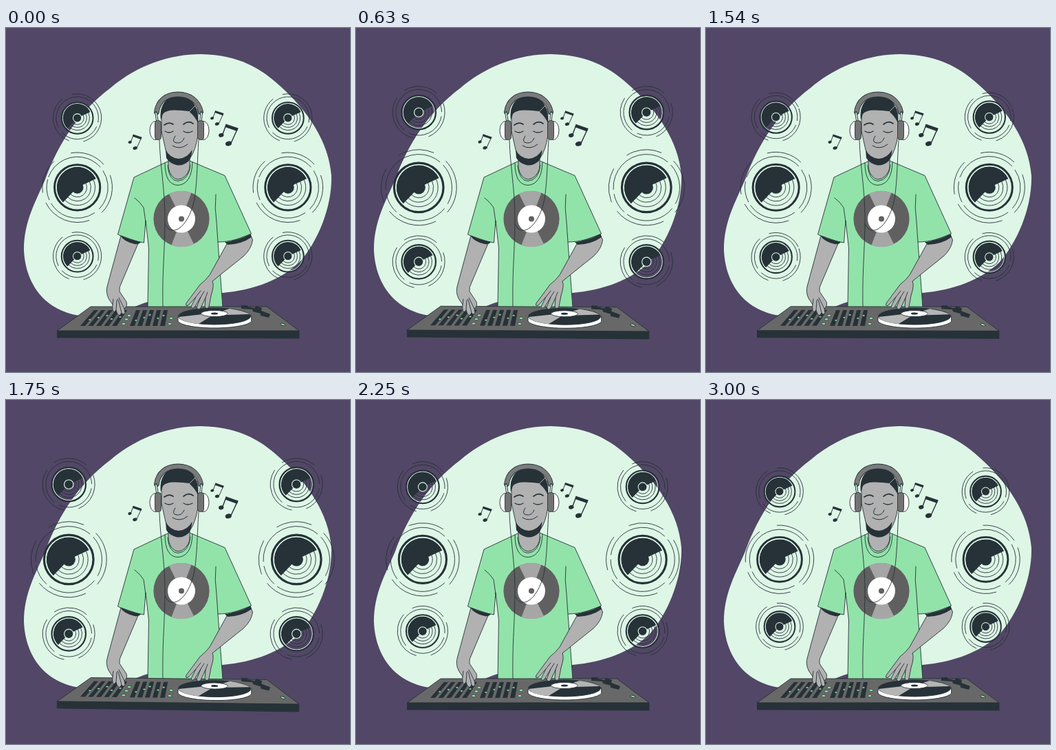
An HTML page that plays this animation: 500x500 px, repeating every 3040 ms.

```html
<!DOCTYPE html>
<html lang="en">
<head>
<meta charset="utf-8">
<title>DJ at the deck</title>
<style>
html, body { margin: 0; width: 100%; height: 100%; overflow: hidden; background: #524766; }
svg { display: block; width: 100vw; height: 100vh; }
.ink { fill: #263238; }
.line { fill: none; stroke: #263238; stroke-width: .9; stroke-linecap: round; stroke-linejoin: round; }
.rings * { vector-effect: non-scaling-stroke; }
.shape { stroke: #263238; stroke-width: .9; stroke-linejoin: round; }
.shirt { fill: #92e3a9; }
.skin { fill: #b1b1b1; }
.metal { fill: #686868; }
.pale { fill: none; stroke: #def6e6; }
</style>
</head>
<body>
<svg viewBox="0 0 500 500">
  <defs>
    <g id="speaker">
      <path class="ink" d="M0 0L27.5 -12.8A30.3 30.3 0 1 0 -21 21.8Z"/>
      <circle class="pale" r="31.2" stroke-width="1.4"/>
      <circle class="line" r="33.4" style="stroke-width:3"/>
      <g class="line rings">
        <path d="M23.6 -11A26 26 0 0 1 -18 18.8M18.1 -8.5A20 20 0 0 1 -13.9 14.4M12.7 -5.9A14 14 0 0 1 -9.7 10.1"/>
        <circle r="45" stroke-dasharray="92 7 60 9 72 6 30 7" transform="rotate(-160)"/>
        <circle r="51.3" stroke-dasharray="58 22 74 16 50 28 52 22" transform="rotate(-20)"/>
      </g>
      <circle class="ink" r="9"/>
    </g>
    <g id="note">
      <path class="ink" d="M10.5 3L28.5 9L27 13.500L9.5 7.500Z"/>
      <path class="line" d="M11 4L5.500 19M27.700 9.500L18 31" style="stroke-width:1.400"/>
      <ellipse class="ink" cx="3.800" cy="19.200" rx="3.800" ry="2.900" transform="rotate(-15 3.800 19.200)"/>
      <ellipse class="ink" cx="14.500" cy="31.500" rx="4.600" ry="3.300" transform="rotate(-15 14.500 31.500)"/>
    </g>
  </defs>

  <path fill="#def6e6" d="M283 38C340 39 372 60 398 84C438 120 469 164 473 215C474 262 452 312 427 340C400 366 360 381 315 385C270 388 230 390 200 400C170 412 150 420 118 419C60 416 28 375 26 322C26 280 44 251 57 220C77 165 108 120 152 87C192 53 240 38 283 38Z"/>
  <g id="speakers"></g>
  <g id="notes">
    <use href="#note" x="309" y="136.5"/>
    <use href="#note" transform="translate(297 118) scale(.68)"/>
    <use href="#note" transform="translate(177.5 152.5) scale(.7)"/>
  </g>

  <!-- torso -->
  <path class="shape shirt" d="M235 194L186 217L162.5 300C175 306 188 310 200.5 312L203 280L207.5 320L206 406H315L308 311C325 311 342 306 356.5 299L318 214.5L267 193Z"/>
  <path class="line" d="M187 247Q195 253 200 261L203 282M305 242Q303 262 306 282L308 311"/>
  <path class="shape skin" d="M236 180V204Q240 219 250 220Q262 219 267 204V180Z"/>
  <path class="line" d="M231 196Q231 228 250 228.5Q270 227 271 195M235 200Q237 222 250 222.5Q266 221 268 199"/>
  <g transform="translate(255 277.5)">
    <circle r="40.6" fill="#606060"/>
    <path fill="#a6a6a6" d="M0 0L-18 -36.4A40.6 40.6 0 0 1 14.5 -38ZM0 0L-14.5 38A40.6 40.6 0 0 0 18 36.4Z"/>
    <circle r="20" fill="#fff"/>
    <circle r="4" fill="#606060"/>
  </g>

  <!-- head and headphones -->
  <ellipse class="shape" cx="217" cy="149" rx="8" ry="13.5" fill="#fff"/>
  <ellipse class="shape" cx="287" cy="149" rx="8" ry="13.5" fill="#fff"/>
  <path class="shape skin" d="M226 118H279V155Q276 178 267 190Q258 200 249 198Q236 191 232 177L226 150Z"/>
  <path class="ink" d="M225 134C222 112 234 98 250 98C268 98 281 112 279 138Q275 130 271 126L266 121Q254 119 242 119.5Q232 120 228 125Z"/>
  <path d="M266 122L275 113" stroke="#b1b1b1"/>
  <path class="ink" d="M232 177Q238 189 251 190Q264 189 270.5 177Q270 187 266 193Q258 200.5 249 199.5Q238 197 233 189Z"/>
  <g class="line" style="stroke-width:1.3">
    <path d="M230 141Q237 136 243 140M258 140Q265 134 272 139" style="stroke-width:1.7"/>
    <path d="M231 150Q237 154 243 150M258 150Q264 154 271 150"/>
    <path d="M246 157Q240 166 248 167Q256 168 259 160M242 171Q253 178 264 169" style="stroke-width:1"/>
  </g>
  <path id="band" class="line" d="M219 122C221 106 233 96.5 250 96.5C267 96.5 280 106 283 122" style="stroke-width:7.8"/>
  <path d="M219 122C221 106 233 96.5 250 96.5C267 96.5 280 106 283 122" fill="none" stroke="#7b7b7b" stroke-width="6" stroke-linecap="round"/>
  <path class="line" d="M218 123L220 136M284 123L283 136" style="stroke-width:3.5"/>
  <path class="pale" d="M218 123L220 136M284 123L283 136" stroke-width="1.6"/>
  <rect class="shape" x="216.5" y="134.5" width="9" height="28" rx="4" fill="#737373"/>
  <rect class="shape" x="278.5" y="134.5" width="9" height="28" rx="4" fill="#737373"/>
  <path class="line" d="M223 163C224 200 231 235 231 275C231 325 227 350 228 405M280 163C278 190 278 235 272 257C264 285 248 300 236 292L231 285"/>

  <!-- deck -->
  <g id="deck">
    <path class="shape ink" d="M74.5 439.5H426V451L74.5 450Z"/>
    <path class="shape metal" d="M123 405L379 405L426 440H74.5Z"/>
    <g id="mixer"></g>
    <path class="shape" fill="#fff" d="M250 420V426A53.3 11 0 0 0 356.6 424V418Z"/>
    <ellipse class="shape ink" cx="303" cy="419" rx="52.5" ry="12"/>
    <path fill="#b5b5b5" d="M303 415L325 408Q346 411 354 416L321 417ZM286 416L251 420Q256 428 280 430L298 419Z"/>
    <ellipse class="shape" cx="303" cy="415" rx="19.5" ry="4.5" fill="#fff"/>
    <ellipse class="ink" cx="303" cy="415" rx="5" ry="1.5"/>
    <path class="ink" d="M342 403H351V405L361 407L364 404L372 407L371 411L384 416L382 421L370 418V415L359 412L358 409L342 408Z"/>
    <ellipse class="shape shirt" cx="402.5" cy="431" rx="3.5" ry="1.6" transform="rotate(18 402.5 431)"/>
  </g>

  <!-- arms -->
  <path class="shape skin" d="M167 302L147.5 374Q144.500 383 149 393L155 402Q154 411 157 413L160 410Q161 416 165 418L168 414Q171 418 173 414L172 408Q177 404 175 398L165 383Q164 377 168 370L193 311Z"/>
  <path class="line" d="M155 402L156 394M160 410L161 396Q163 392 164 398L168 414M164 392L172 408"/>
  <path class="ink" d="M166 301.5Q180 308 196 311Q193 315 187 314Q172 311 166 301.5Z"/>
  <path class="shape skin" d="M322 312L296 359Q290 367 282 373L262 400Q260 405 265 403L276 391L269 405Q270 409 274 406L283 391L277 406Q279 411 283 407L290 392L289 405Q292 410 295 405L298 389Q303 374 300 368L345 332Q357 321 358.5 308L355 300Z"/>
  <path class="line" d="M276 391L283 382M283 391L288 383M290 392L293 384"/>
  <path class="ink" d="M318 311Q338 309 355.5 299.5L357 304Q342 314.5 322 315Z"/>
</svg>
<script>
const $ = id => document.getElementById(id);

// Speaker stacks
for (const x of [107, 406.5])
  for (const [y, size] of [[133, .67], [231.8, .97], [329.5, .67]])
    $('speakers').innerHTML += `<g transform="translate(${x} ${y}) scale(${size})"><use href="#speaker"/>
      ${size < .9 ? '<circle class="pale" r="9" stroke-width="1.5"/>' : ''}</g>`;

// Faders and buttons
let mixer = '';
const dot = (x, y, r) => `<ellipse class="shape shirt" cx="${x}" cy="${y}" rx="${r}" ry="${r * .6}" style="stroke-width:.6"/>`;
for (let i = 0; i < 5; i++) {
  const a = 128 + i * 10.5, b = 189 + i * 10;
  mixer += `<path class="ink" d="M${a} 410h6L${a - 13 + i} 433h-7ZM${b} 410h6L${b - 2 + i} 433h-7Z"/>`;
  mixer += dot(a - 6 + i % 3 * 2, 424 - i * 3 % 8, 2) + dot(b + i % 2 * 2, 425 - i * 4 % 9, 2);
}
for (const [x, y] of [[179, 418], [175, 423.5], [171, 430], [240, 422], [238, 430]]) mixer += dot(x, y, 2.8);
$('mixer').innerHTML = mixer;

const LOOP = 3040, BEAT = 1520, SWAY = 1500;
// [time, scale] of the double heartbeat
const beats = [[-33, 1], [180, 1.14], [385, 1], [482, 1], [592, 1.12], [910, 1], [1487, 1], [1520, 1.022]];

function pulse(t) {
  const i = beats.findIndex(([end]) => t < end);
  const [t0, s0] = beats[i - 1], [t1, s1] = beats[i];
  return s0 + (s1 - s0) * (t - t0) / (t1 - t0);
}

// Triangle wave: 0, 1, 0, -1 degrees
function sway(t) {
  const p = t % SWAY / SWAY;
  return p < .25 ? 4 * p : p < .75 ? 2 - 4 * p : 4 * p - 4;
}

function draw(now) {
  const t = now % LOOP;
  // The last moments of the loop rest before the jump back.
  const s = t >= 3000 ? 1 : pulse(t % BEAT);
  $('speakers').setAttribute('transform', `translate(256.75 231.5) scale(${s}) translate(-256.75 -231.5)`);
  $('deck').setAttribute('transform', `rotate(${sway(t)} 250.5 427)`);
  $('notes').setAttribute('transform', `rotate(${sway(t)} 258 148)`);
}

const start = performance.now();
function frame() {
  draw(performance.now() - start);
  requestAnimationFrame(frame);
}
frame();
</script>
</body>
</html>
```
